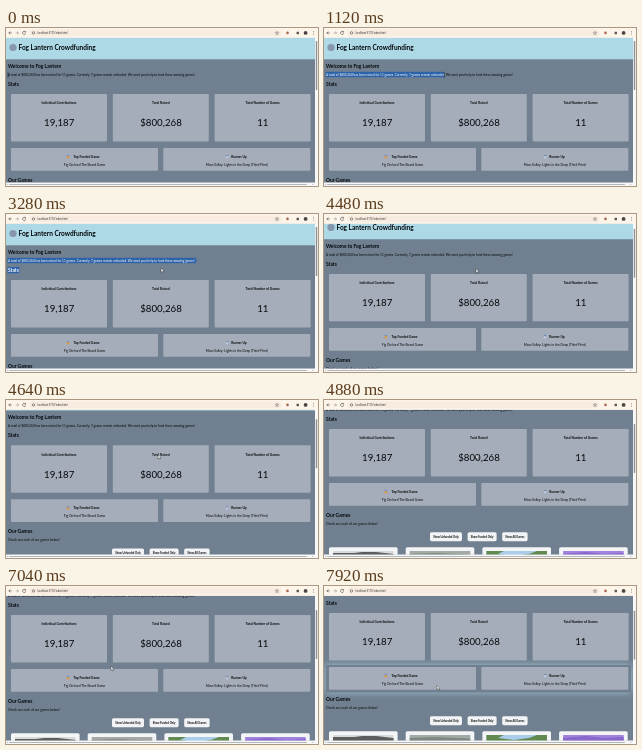
Animation, 312 px wide and 158 px high, one loop 8 s. Source, as an HTML page:

```html
<!DOCTYPE html>
<html lang="en">
<head>
<meta charset="utf-8">
<title>Crowdfunding page</title>
<style>
  html, body { margin: 0; width: 100%; height: 100%; overflow: hidden; background: #fff; }
  svg { display: block; width: 100vw; height: 100vh; }
  text { font-family: Lato, "Open Sans", sans-serif; font-size: 3.25px; fill: #05080b; white-space: pre; }
  .h1 { font-size: 6.5px; font-weight: 700; }
  .h2 { font-size: 4.9px; font-weight: 700; }
  .intro { font-size: 3.12px; }
  .bold { font-weight: 700; }
  .mid { text-anchor: middle; }
  .stat { font-size: 9.7px; text-anchor: middle; }
  .button { font-size: 2.7px; font-weight: 700; text-anchor: middle; }
  .url { font-family: Roboto, sans-serif; font-size: 2.6px; fill: #333; }
  .line { fill: none; stroke: #4a4744; stroke-width: .6; }
</style>
</head>
<body>
<svg id="stage" viewBox="0 0 312 158" preserveAspectRatio="none">
  <defs>
    <filter id="blur" filterUnits="userSpaceOnUse" x="-12" y="40" width="336" height="130">
      <feGaussianBlur stdDeviation="3"/>
    </filter>
    <clipPath id="view"><rect y="9.7" width="309" height="145"/></clipPath>
    <clipPath id="paraClip"><rect id="paraClipBox" y="43.6" height="5.8"/></clipPath>
    <clipPath id="statsClip"><rect id="statsClipBox" y="52.8" height="6.6"/></clipPath>
  </defs>
  <rect width="312" height="158" fill="#f8f9fa"/>
  <g clip-path="url(#view)">
    <rect width="312" height="158" fill="#708090"/>
    <g id="page"></g>
  </g>
  <g id="chrome"></g>
  <g id="cursor">
    <path id="arrow" d="M0 0V4.2L1 3.3L1.7 4.9L2.4 4.6L1.7 3.1H3Z" fill="#fff" stroke="#111" stroke-width=".35"/>
    <path id="beam" d="M-.8 -2H.8M0 -2V2M-.8 2H.8" fill="none" stroke="#111" stroke-width=".4"/>
  </g>
</svg>
<script>
const LOOP = 8000;
const $ = id => document.getElementById(id);
const page = $('page'), chrome = $('chrome');

function add(parent, tag, attrs, content) {
  const el = document.createElementNS('http://www.w3.org/2000/svg', tag);
  for (const key in attrs) el.setAttribute(key, attrs[key]);
  if (content) el.textContent = content;
  parent.appendChild(el);
  return el;
}
const rect = (parent, x, y, width, height, fill, rx = 0) =>
  add(parent, 'rect', { x, y, width, height, fill, rx });
const label = (parent, x, y, content, cls = '') =>
  add(parent, 'text', { x, y, class: cls }, content);
const dot = (parent, cx, cy, r, fill) => add(parent, 'circle', { cx, cy, r, fill });
const path = (parent, d, attrs) => add(parent, 'path', { d, class: 'line', ...attrs });
const shape = (parent, d, fill) => path(parent, d, { style: `fill:${fill};stroke:none` });

// Glow outside a container, its inside kept in the page colour
function makeGlow(y, height) {
  const g = add(page, 'g', {});
  add(g, 'rect', { x: 2, y, width: 305, height, fill: '#add8e6', opacity: .8, filter: 'url(#blur)' });
  rect(g, 2, y, 305, height, '#708090');
  return { g, y, height };
}

function medal(x, color) {
  path(page, `M${x - 1} 126.9L${x} 128.6L${x + 1} 126.9`, { style: 'stroke:#3f74b8' });
  dot(page, x, 129.3, 1.2, color);
}

// Top edges of the four game pictures
function buildGames() {
  const y = 188, tones = ['#d9dbdb', '#a3aaa6', '#a9cdea', '#a083dc'];
  tones.forEach((tone, i) => {
    const x = 5 + i * 76.7;
    rect(page, x, 184.2, 68.6, 50, '#f4f5f7', 1.6);
    rect(page, x + 4, y, 60.6, 34, tone);
  });
  shape(page, `M9 ${y + 2}H30L38 ${y + 1}H52L69.6 ${y + 3}V222H9Z`, '#5b5d5e');
  shape(page, `M85.7 ${y + 3}L110 ${y + 2}L146.3 ${y + 3.5}V222H85.7Z`, '#7f8983');
  shape(page, `M162.4 ${y}H180L174 ${y + 3}L190 ${y + 5}L205 ${y + 3}L213 ${y}H223V222H162.4Z`, '#628a50');
  shape(page, `M239.1 ${y + 3}L262 ${y + 1}L280 ${y + 3}L299.7 ${y + 2}V222H239.1Z`, '#8a68cb');
}

function buildPage() {
  rect(page, 0, 9.7, 309, 21.6, '#add8e6');
  dot(page, 7, 19.5, 3.6, '#8797ab');
  label(page, 12.5, 22.1, 'Fog Lantern Crowdfunding', 'h1');
  label(page, 2, 39.7, 'Welcome to Fog Lantern', 'h2');

  const glows = [makeGlow(64, 51.5), makeGlow(118, 27.5)];

  const intro = 'A total of $800,268 has been raised for 11 games. Currently, 7 games remain unfunded. ' +
    'We need your help to fund these amazing games!';
  const selectable = (id, y, top, height, content, cls) => {
    const base = label(page, 2, y, content, cls);
    const mark = add(page, 'g', { 'clip-path': `url(#${id}Clip)` });
    rect(mark, 0, top, 309, height, '#2c62a8');
    label(mark, 2, y, content, cls).style.fill = '#fff';
    return { base, box: $(id + 'ClipBox') };
  };
  const para = selectable('para', 47.9, 43.6, 5.8, intro, 'intro');
  const stats = selectable('stats', 57.8, 52.8, 6.6, 'Stats', 'h2');

  const cards = [['Individual Contributions', '19,187'], ['Total Raised', '$800,268'], ['Total Number of Games', '11']];
  cards.forEach(([title, value], i) => {
    const x = 5 + i * 101.8;
    rect(page, x, 66, 96, 47.4, '#a4adb9', .8);
    label(page, x + 48, 76.4, title, 'mid bold');
    label(page, x + 48.2, 98.4, value, 'stat');
  });

  const winners = [
    ['Top Funded Game', 'Fig Orchard The Board Game', '#e5953a', 80.5, 61.8],
    ['Runner Up', 'Moss Valley: Lights in the Deep (Third Print)', '#b9c8dc', 233, 221]
  ];
  winners.forEach(([title, name, color, titleX, medalX], i) => {
    const x = 5 + i * 152.3;
    rect(page, x, 120, 147, 22.8, '#a4adb9', .8);
    medal(medalX, color);
    label(page, titleX, 130.2, title, 'mid bold');
    label(page, x + 73.5, 138.2, name, 'mid');
  });

  label(page, 2, 154, 'Our Games', 'h2');
  label(page, 2, 162.2, 'Check out each of our games below!');
  const buttons = [[106, 32, 'Show Unfunded Only'], [143.6, 29, 'Show Funded Only'], [178.2, 25.4, 'Show All Games']];
  for (const [x, width, name] of buttons) {
    rect(page, x, 169.2, width, 9, '#f2f3f5', 1.6);
    label(page, x + width / 2, 174.6, name, 'button');
  }
  buildGames();
  return { glows, para, stats };
}

function buildChrome() {
  rect(chrome, 0, 0, 312, 9.7, '#fdf4ea');
  rect(chrome, 23.5, 1.6, 252, 6.6, '#f8ece0', 3.3);
  path(chrome, 'M5.8 4.9H2.8M4.2 3.5L2.8 4.9L4.2 6.3');
  path(chrome, 'M9.6 4.9H12.6M11.2 3.5L12.6 4.9L11.2 6.3', { opacity: .55 });
  path(chrome, 'M19.4 3.9A1.6 1.6 0 1 0 19.7 5.3M19.6 3V4.1H18.5');
  add(chrome, 'circle', { cx: 27.5, cy: 4.9, r: 1.2, class: 'line' });
  label(chrome, 31.5, 5.8, 'localhost:5173/index.html', 'url');
  path(chrome, 'M271 3.3L271.5 4.4L272.7 4.5L271.8 5.3L272.1 6.5L271 5.8L269.9 6.5L270.2 5.3L269.3 4.5L270.5 4.4Z',
    { style: 'stroke-width:.4' });
  dot(chrome, 281.5, 4.9, 1.3, '#a8674f');
  rect(chrome, 290.5, 3.7, 2.5, 2.5, '#5d5a56', .4);
  dot(chrome, 299.6, 4.9, 1.9, '#4a4543');
  for (const y of [3.5, 4.9, 6.3]) dot(chrome, 307.5, y, .4, '#444');

  rect(chrome, 309, 9.7, 3, 148.3, '#f8f8f8');
  rect(chrome, 0, 154.7, 312, 3.3, '#f8f8f8');
  rect(chrome, 3, 156, 298, 1, '#b4b7ba', .5);
  shape(chrome, 'M1.7 155.7L.8 156.4L1.7 157.1ZM306.6 155.7L307.5 156.4L306.6 157.1Z', '#777');
  return rect(chrome, 309.8, 13, 1.4, 49, '#8b8f94', .6);
}

const { glows, para, stats } = buildPage();
const thumb = buildChrome();

// Linear track through [time, value] points
function track(points, t) {
  let prev = points[0];
  for (const next of points) {
    if (t < next[0]) return prev[1] + (next[1] - prev[1]) * (t - prev[0]) / (next[0] - prev[0]);
    prev = next;
  }
  return prev[1];
}

const scrollTrack = [[4380, 0], [4480, 6], [4600, 17], [4720, 28], [4800, 34], [4880, 37], [7680, 37], [7920, 39], [8000, 40]];
const cursorX = [[0, 2], [640, 2], [1400, 189], [1680, 158], [1920, 152], [2400, 152], [3200, 155], [3280, 155],
  [4160, 152], [5500, 152], [6000, 93], [6700, 96], [7350, 113]];
const cursorY = [[0, 47], [1400, 47], [1680, 52], [2400, 52], [3200, 54], [4160, 54.6], [5500, 54.6],
  [6000, 53], [6700, 59], [7350, 99.5]];

function draw(t) {
  const scroll = track(scrollTrack, Math.max(t, scrollTrack[0][0]));
  const x = track(cursorX, t), y = track(cursorY, t);
  page.setAttribute('transform', `translate(0 ${-scroll})`);
  thumb.setAttribute('y', 13 + scroll * .3);

  const selecting = t >= 640 && t < 4160;
  const onStats = selecting && t >= 1560;
  const full = para.base.getComputedTextLength() + 2;
  para.box.setAttribute('x', 1.5);
  para.box.setAttribute('width', !selecting ? 0 : onStats ? full : Math.min(full, Math.max(0, x - 1.5)));
  stats.box.setAttribute('x', 1.5);
  stats.box.setAttribute('width', onStats ? stats.base.getComputedTextLength() + 1 : 0);

  for (const { g, y: top, height } of glows) {
    const inside = y + scroll >= top && y + scroll <= top + height;
    g.style.display = t >= 5900 && inside ? '' : 'none';
  }

  const beam = t < 1600;
  $('cursor').setAttribute('transform', `translate(${x} ${y})`);
  $('arrow').style.display = beam ? 'none' : '';
  $('beam').style.display = beam ? '' : 'none';
}

const start = performance.now();
function tick() {
  draw((performance.now() - start) % LOOP);
  requestAnimationFrame(tick);
}
tick();
</script>
</body>
</html>
```
